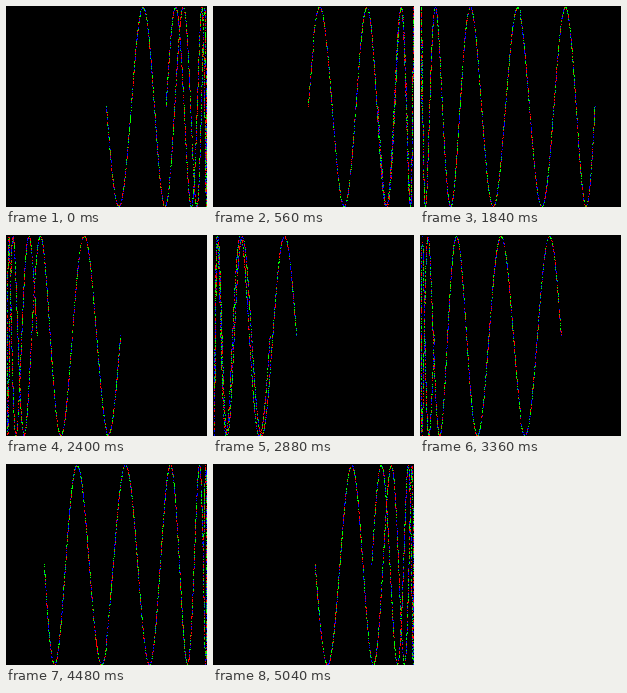
Recreate the animation shown at these times as an HTML page with a canvas. Size 201x201 px, loop 5.12 s.

```html
<!DOCTYPE html>
<html lang="en">
<head>
<meta charset="utf-8">
<title>Lissajous</title>
<style>
  html, body { margin: 0; width: 100%; height: 100%; overflow: hidden; background: #000; }
  canvas { display: block; width: 201px; height: 201px; image-rendering: pixelated; }
</style>
</head>
<body>
<canvas id="stage" width="201" height="201"></canvas>
<script>
const SIZE = 100, WIDTH = 2 * SIZE + 1;
const CYCLES = 5, STEP = 0.001, FREQ = 0.0797;
const FRAMES = 64, DELAY = 80, PHASE_STEP = 0.1;

const ctx = document.getElementById('stage').getContext('2d');
const image = ctx.createImageData(WIDTH, WIDTH);
const pixels = new Uint32Array(image.data.buffer);
const BLACK = 0xff000000;
const palette = [BLACK, 0xff0000ff, 0xff00ff00, 0xffff0000]; // ABGR

function random(seed) {
  let a = Math.imul(seed + 1, 0x9e3779b1);
  return () => {
    a = (a + 0x6d2b79f5) | 0;
    let r = Math.imul(a ^ (a >>> 15), a | 1);
    r ^= r + Math.imul(r ^ (r >>> 7), r | 61);
    return ((r ^ (r >>> 14)) >>> 0) / 4294967296;
  };
}

// Truncates toward zero, so the curve spans 1 to 200
const place = v => SIZE + Math.trunc(v * SIZE + 0.5);

function draw(frame) {
  const rand = random(frame);
  const phase = frame * PHASE_STEP;
  pixels.fill(BLACK);
  for (let t = 0; t < CYCLES * 2 * Math.PI; t += STEP) {
    const x = place(Math.sin(t * FREQ + phase));
    const y = place(Math.sin(t));
    pixels[y * WIDTH + x] = palette[Math.floor(rand() * palette.length)];
  }
  ctx.putImageData(image, 0, 0);
}

let shown = -1;
const start = performance.now();

function tick() {
  const elapsed = performance.now() - start;
  const frame = Math.floor(elapsed / DELAY) % FRAMES;
  if (frame !== shown) draw(shown = frame);
  requestAnimationFrame(tick);
}
tick();
</script>
</body>
</html>
```
